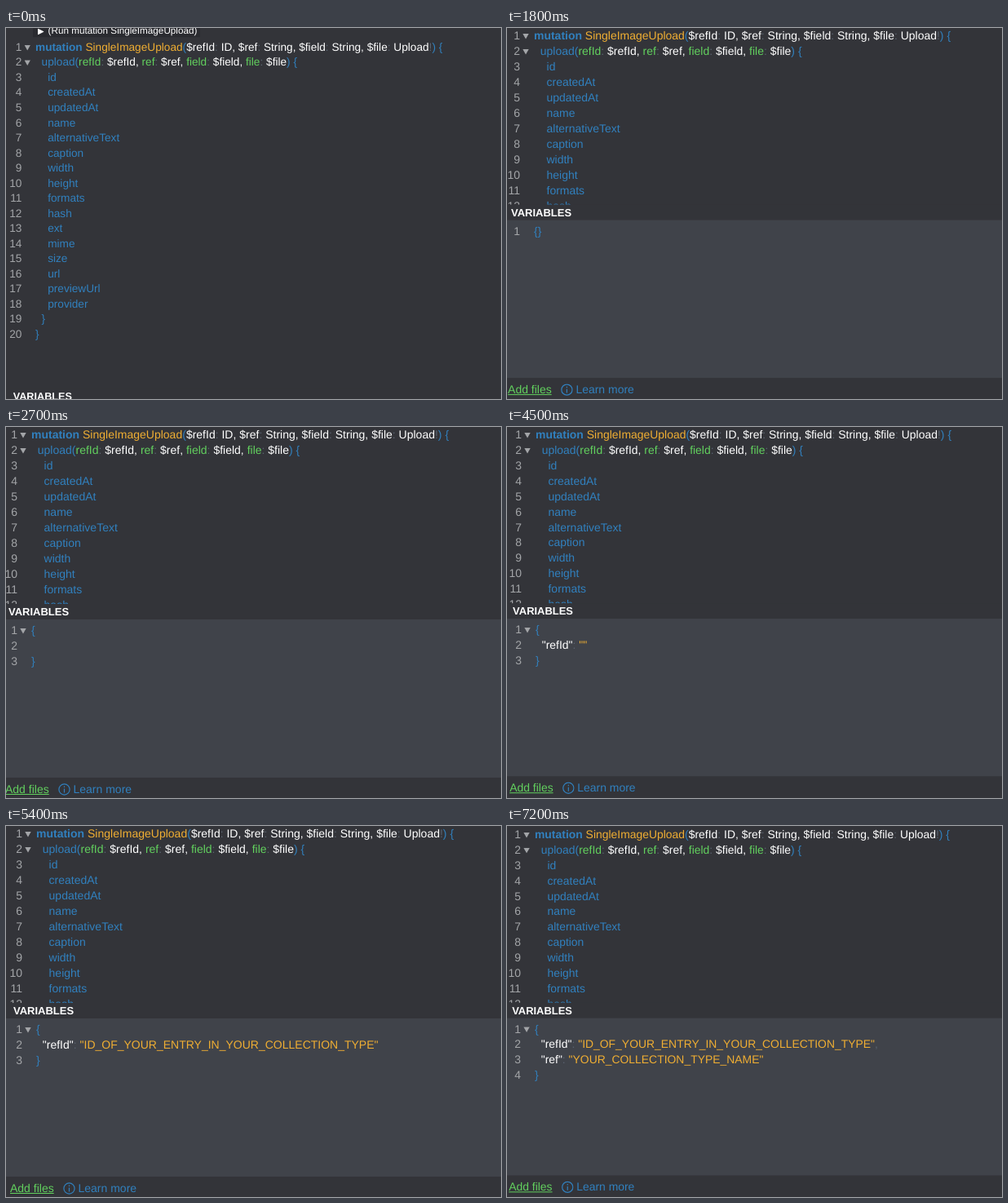
An HTML page that plays this animation: 607 by 455 pixels, repeating every 8 s.

```html
<!DOCTYPE html>
<html lang="en">
<head>
<meta charset="utf-8">
<style>
  html, body { margin: 0; width: 100%; height: 100%; overflow: hidden; }
  #stage { position: relative; width: 100%; height: 100%; overflow: hidden; contain: strict; background: #333439; }
  #view { position: absolute; left: 0; top: 0; transform-origin: 0 0; color: #3180be;
    font: 14px/19px "Liberation Sans", Arial, sans-serif; white-space: pre; text-rendering: geometricPrecision; }
  #view div { position: absolute; left: 0; top: 0; }
  #view .num { left: auto; right: 17px; color: #a3a5a8; }
  #view .fold { left: -14px; width: 8px; height: 7px; background: #a3a5a8; clip-path: polygon(0 0, 100% 0, 50% 100%); }
  .kw { font-weight: bold; }
  .name, .str { color: #efae33; }
  .key { color: #fff; }
  .arg { color: #62d05e; }
  .dim { color: #596370; }
  #view #run { left: -3px; top: -30px; width: 210px; height: 18px; background: #2a2b30; color: #fff; font-size: 12px; }
  #view #run div { left: 19px; top: 1px; }
  #view #run .play { left: 6px; top: 7px; width: 8px; height: 8px; background: #fff; clip-path: polygon(0 0, 100% 50%, 0 100%); }
  #view #lower { left: -60px; width: 900px; height: 300px; background: #333439; }
  #view #title { left: 32px; color: #fff; font-weight: bold; font-size: 13px; }
  #view #panel { top: 19px; width: 100%; height: 193.5px; background: #40434a; }
  #view #vars { left: 60px; top: 22.5px; }
  #view #files { left: 28px; top: 217.5px; color: #62d05e; text-decoration: underline; }
  #view #learn { left: 111.5px; top: 217.5px; }
  #lower svg { position: absolute; left: 93px; top: 220px; }
  #view #popup { left: 68px; top: 61.5px; width: 172px; height: 119px; background: #333439; border: 1px solid #d4d5d7; border-radius: 3px; color: #0b0b0d; }
  #view #popup div { left: 2px; width: 160px; padding-left: 10px; height: 29px; line-height: 29px; border-radius: 2px; }
  #popup div:first-child { background: #3e56ff; color: #fff; }
  #view #caret { left: 72.7px; top: 42px; width: 1px; height: 18px; background: #4f9be0; }
</style>
</head>
<body>
<div id="stage"><div id="view">
  <div id="query"></div>
  <div id="run"><div class="play"></div><div>(Run mutation SingleImageUpload)</div></div>
  <div id="lower">
    <div id="title">VARIABLES</div>
    <div id="panel"></div>
    <div id="vars"></div>
    <div id="files">Add files</div>
    <svg width="15" height="15" fill="none" stroke="#3180be" stroke-width="1.2">
      <circle cx="7.5" cy="7.5" r="6.6"/><path d="M7.5 6.5v5M7.5 3.6v1.5"/>
    </svg>
    <div id="learn">Learn more</div>
    <div id="caret"></div>
    <div id="popup"></div>
  </div>
</div></div>
<script>
const $ = id => document.getElementById(id);
const token = /(?<kw>mutation)|(?<name>Single\w+)|(?<key>^\s*"\w*"|\$\w+|ID\b|String|Upload|,(?=.))|(?<str>"\w*")|(?<arg>\w+(?=:))|(?<dim>[:!,])/g;

const paint = text => text.replace(token, (match, ...rest) => {
  const groups = rest.at(-1);
  const kind = Object.keys(groups).find(k => groups[k] !== undefined);
  return `<span class="${kind}">${match}</span>`;
});

const editor = (lines, top) => lines.map((line, i) => {
  const y = top + i * 19;
  const fold = line.endsWith('{') ? `<div class="fold" style="top:${y + 7}px"></div>` : '';
  return `<div class="num" style="top:${y}px">${i + 1}</div>${fold}<div style="top:${y}px">${paint(line)}</div>`;
}).join('');

const fields = 'id createdAt updatedAt name alternativeText caption width height formats hash ext mime size url previewUrl provider';
$('query').innerHTML = editor([
  'mutation SingleImageUpload($refId: ID, $ref: String, $field: String, $file: Upload!) {',
  '  upload(refId: $refId, ref: $ref, field: $field, file: $file) {',
  ...fields.split(' ').map(f => '    ' + f), '  }', '}'
], -9.5);
$('popup').innerHTML = ['refId', 'ref', 'field', 'file']
  .map((key, i) => `<div style="top:${2 + i * 28.8}px">"${key}":</div>`).join('');

const refId = '  "refId": "ID_OF_YOUR_ENTRY_IN_YOUR_COLLECTION_TYPE"';
// x and y of the first code line, zoom, variables
const shots = [
  [36, 23, .975, ['']],
  [35, 8, .995, ['']],
  [33, 9, .998, ['{}']],
  [31, 9, 1, ['{', '', '}']],
  [35, 10, .994, ['{', '  ""', '}']],
  [35, 9, .996, ['{', '  "refId": ""', '}']],
  [37, 9, 1, ['{', refId, '}']],
  [35.5, 9.5, .997, ['{', refId + ',', '  "ref": ""', '}']],
  [34, 10, .994, ['{', refId + ',', '  "ref": "YOUR_COLLECTION_TYPE_NAME"', '}']]
];

let shown = -1;
function draw(now) {
  const index = Math.floor(now % 8000 / 900);
  if (index !== shown) {
    shown = index;
    const [x, y, zoom, lines] = shots[index];
    $('view').style.transform = `translate(${x}px, ${y}px) scale(${zoom})`;
    $('lower').style.top = (index ? 208 : 429.5) + 'px';
    $('vars').innerHTML = editor(lines, 0);
    $('popup').hidden = $('caret').hidden = index !== 4;
  }
  requestAnimationFrame(draw);
}
draw(performance.now());
</script>
</body>
</html>
```
